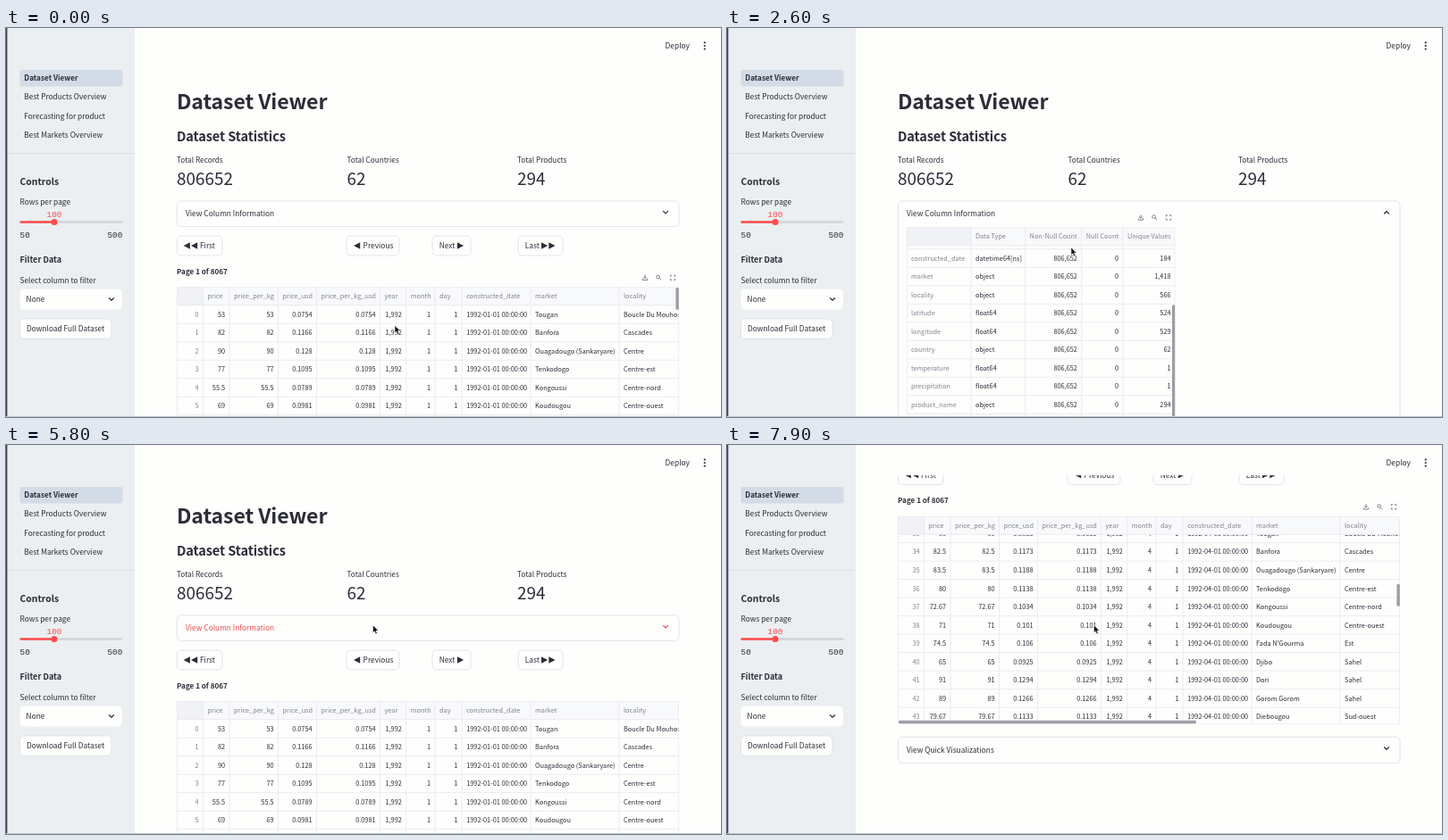
An HTML page that plays this animation: 800x436 px, repeating every 8 s.

```html
<!DOCTYPE html>
<html lang="en">
<head>
<meta charset="utf-8">
<title>Dataset Viewer</title>
<style>
html, body { margin: 0; width: 100%; height: 100%; overflow: hidden; background: #fefefd; }
svg { display: block; }
#stage { width: 800px; height: 436px; }
text { font: 8.35px "Noto Sans CJK JP", "Noto Sans CJK SC", "Noto Sans CJK", sans-serif; fill: #2b2d38; white-space: pre; }
.b { font-weight: 700; }
.cell { font-size: 7.35px; }
.dim { font-size: 7.35px; fill: #82848e; }
.mono { font: 9.4px "Liberation Mono", monospace; }
.num { font-size: 18.9px; }
.box { fill: #fefefd; stroke: #dcdde4; stroke-width: .8; }
.grid { fill: none; stroke: #e7e7ef; stroke-width: .8; }
.icon { fill: none; stroke: #6f717c; stroke-width: .9; }
.chev { fill: none; stroke: #31333f; stroke-width: 1.25; stroke-linecap: round; stroke-linejoin: round; }
.bar { fill: #9d9ea6; }
text.red, .red { fill: #ff4b4b; }
.hot text { fill: #f04a48; }
.hot .chev { stroke: #f04a48; }
</style>
</head>
<body>
<svg id="stage" viewBox="0 0 800 436"></svg>
<script>
const BG = '#fefefd', INK = '#2b2d38', ROW = 20.51, LOOP = 8000, TICK = 100;

// Text placed by the middle of its capitals.
const text = (x, y, s, cls = '', size = 8.35, end = false, extra = '') =>
  `<text x="${x}" y="${(y + size * 0.366).toFixed(2)}" class="${cls}" style="font-size:${size}px;${extra}"` +
  `${end ? ' text-anchor="end"' : ''}>${s}</text>`;
const rect = (x, y, w, h, attrs, r = 0) =>
  `<rect x="${x}" y="${y}" width="${w}" height="${h}" rx="${r}" ${attrs}/>`;
const box = (x, y, w, h, r = 4.5) => rect(x, y, w, h, 'class="box"', r);
const line = (x1, y1, x2, y2) => `<path class="grid" d="M${x1} ${y1}L${x2} ${y2}"/>`;
const chevron = (x, y, id = '') => `<path ${id} class="chev" d="M${x - 2.5} ${y - 1.3}l2.5 2.5l2.5 -2.5"/>`;
const tri = (x, y, dir) =>
  `<path fill="${INK}" d="M${x + 3.6 * dir} ${y}l${-7.2 * dir} -3.7v7.4z"/>`;
const tools = (id, x, y) => `<g id="${id}" class="icon">
  <path d="M${x} ${y - 3}v4m-1.8 -1.8l1.8 1.8l1.8 -1.8M${x - 2.7} ${y + 1}v1.8h5.4v-1.8"/>
  <circle cx="${x + 14.6}" cy="${y - .7}" r="1.8"/><path d="M${x + 16} ${y + .7}l2 2"/>
  <path d="M${x + 28.3} ${y - 1}v-1.6h1.6m2.2 0h1.6v1.6m0 2.2v1.6h-1.6m-2.2 0h-1.6v-1.6"/></g>`;

// Scrolling table; columns: [left edge, title, right aligned].
function table(id, x, y, w, h, cols, rows) {
  const edge = i => i + 1 < cols.length ? cols[i + 1][0] : w;
  const cell = (v, i, cy, head) => {
    const end = cols[i][2] && !head;
    return text(end ? edge(i) - 4.9 : cols[i][0] + 5, cy, v, i === 0 || head ? 'dim' : 'cell', 7.35, end);
  };
  const body = rows.map((r, n) => r.map((v, i) => cell(v, i, ROW * (n + .5))).join('') +
    line(0, ROW * (n + 1), w, ROW * (n + 1))).join('');
  return `<svg x="${x}" y="${y}" width="${w}" height="${h}">
    <svg y="${ROW}" width="${w}" height="${h - ROW}"><g id="${id}Rows">${body}</g></svg>
    ${rect(0, 0, w, ROW, 'fill="#f8f9fb"')}${rect(0, 0, edge(0), ROW, 'fill="#f1f2f6"')}
    ${cols.map((c, i) => cell(c[1], i, ROW / 2, true) + (i ? line(c[0], 0, c[0], h) : '')).join('')}
    ${line(0, ROW, w, ROW)}${rect(.4, .4, w - .8, h - .8, 'class="grid"', 3)}
    <g id="${id}Bars"></g></svg>`;
}

// Column summary
const info = [
  ['price', 'float64', '99,241'], ['price_per_kg', 'float64', '94,941'],
  ['price_usd', 'float64', '405,137'], ['price_per_kg_usd', 'float64', '350,823'],
  ['year', 'int64', '19'], ['month', 'int64', '12'], ['day', 'int64', '1'],
  ['constructed_date', 'datetime64[ns]', '184'], ['market', 'object', '1,418'],
  ['locality', 'object', '566'], ['latitude', 'float64', '524'], ['longitude', 'float64', '529'],
  ['country', 'object', '62'], ['temperature', 'float64', '1'], ['precipitation', 'float64', '1'],
  ['product_name', 'object', '294'], ['category', 'object', '8']
].map(([name, type, unique]) => {
  const gaps = name.includes('per_kg');
  return [name, type, gaps ? '699,874' : '806,652', gaps ? '106,778' : '0', unique];
});
const infoCols = [[0, ''], [72, 'Data Type'], [132.6, 'Non-Null Count', 1], [195.8, 'Null Count', 1], [242, 'Unique Values', 1]];

// Price records: eleven markets a month
const places = [
  ['Tougan', 'Boucle Du Mouhoun'], ['Banfora', 'Cascades'], ['Ouagadougo (Sankaryare)', 'Centre'],
  ['Tenkodogo', 'Centre-est'], ['Kongoussi', 'Centre-nord'], ['Koudougou', 'Centre-ouest'],
  ["Fada N'Gourma", 'Est'], ['Djibo', 'Sahel'], ['Gorom Gorom', 'Sahel'], ['Dori', 'Sahel'], ['Diebougou', 'Sud-ouest']
];
const first = [53, 82, 90, 77, 55.5, 69, 70.25, 57.67, 75.75, 73, 75];
const last = [60, 82.5, 83.5, 80, 72.67, 71, 74.5, 65, 91, 89, 79.67];
const records = Array.from({ length: 46 }, (_, n) => {
  const i = n % 11, m = Math.floor(n / 11);
  const price = m === 0 ? first[i] : m === 3 ? last[i] : Math.round(first[i] + (last[i] - first[i]) * m / 3);
  const usd = +(price * 0.00142235).toFixed(4);
  const place = places[m === 3 && (i === 8 || i === 9) ? 17 - i : i];
  return [n, price, price, usd, usd, '1,992', m + 1, 1, `1992-0${m + 1}-01 00:00:00`, ...place];
});
const recordCols = [[0, '', 1], [29.5, 'price', 1], [59, 'price_per_kg', 1], [113.5, 'price_usd', 1],
  [156.5, 'price_per_kg_usd', 1], [227.5, 'year', 1], [256.7, 'month', 1], [289, 'day', 1],
  [319.2, 'constructed_date'], [396, 'market'], [495, 'locality']];

const metric = (x, label, value) => text(x, 148, label, '', 8.25) + text(x, 169, value, 'num', 18.9);

const page = `<g id="page">
  ${text(191, 83, 'Dataset Viewer', 'b', 23.1, false, 'letter-spacing:-.005em')}
  ${text(191, 122, 'Dataset Statistics', 'b', 14.6, false, 'letter-spacing:-.008em')}
  ${metric(191, 'Total Records', '806652')}${metric(381.5, 'Total Countries', '62')}${metric(572, 'Total Products', '294')}
  <rect id="panel" x="191.4" y="194" width="561.6" rx="4.5" class="box"/>
  <svg id="fold" x="191" y="222.5" width="562" height="0">
    ${table('info', 10, .7, 300.5, 230, infoCols, info)}
  </svg>
  <g id="head">${text(201, 208, 'View Column Information')}${chevron(738, 206.7, 'id="arrow"')}</g>
  ${tools('infoTools', 463, 212.3)}
  <g id="below">
    ${box(191.4, 233, 50.6, 22)}${tri(202.3, 244, -1)}${tri(210.6, 244, -1)}${text(217, 244, 'First')}
    ${box(381, 233, 59, 22)}${tri(392.6, 244, -1)}${text(399.6, 244, 'Previous')}
    ${box(477, 233, 43, 22)}${text(484.7, 244, 'Next')}${tri(508.5, 244, 1)}
    ${box(573, 233, 50, 22)}${text(580.8, 244, 'Last')}${tri(602.6, 244, 1)}${tri(610.9, 244, 1)}
    ${text(191, 273, 'Page 1 of 8067', 'b', 8.15)}
    ${tools('mainTools', 715, 279.7)}
    ${table('main', 191, 290.2, 562, 233.5, recordCols, records)}
    ${box(191.4, 537.8, 561.6, 29.4)}${text(201, 552.5, 'View Quick Visualizations')}${chevron(738, 550.6)}
  </g></g>
  ${rect(145, 0, 655, 34, `fill="${BG}"`)}
  ${text(737.6, 20, 'Deploy')}
  ${[16.4, 20, 23.6].map(y => `<circle cx="781.7" cy="${y}" r="1.05" fill="${INK}"/>`).join('')}`;

const links = ['Dataset Viewer', 'Best Products Overview', 'Forecasting for product', 'Best Markets Overview'];
const sidebar = rect(0, 0, 144, 436, 'fill="#ebeff1"') +
  rect(15.5, 47, 115, 18.4, 'fill="#d2dbe6"', 2.4) +
  links.map((s, i) => text(20.3, 56.3 + i * 21.1, s, i ? '' : 'b', i ? 8.35 : 8.2)).join('') +
  rect(0, 140, 144, .8, 'fill="#d9dde2"') +
  text(15.5, 171.8, 'Controls', 'b', 10.4) + text(15.5, 195.3, 'Rows per page') +
  `<text x="45.6" y="212" class="mono red">100</text>` +
  rect(15.5, 216.3, 115, 2.4, 'fill="#cfd4da"', 1.2) + rect(15.5, 216.3, 38.5, 2.4, 'class="red"', 1.2) +
  `<circle cx="54" cy="217.5" r="3.5" class="red"/>
   <text x="15.5" y="234.6" class="mono">50</text><text x="130.3" y="234.6" class="mono" text-anchor="end">500</text>` +
  text(15.5, 259.3, 'Filter Data', 'b', 9.1) + text(15.5, 282.6, 'Select column to filter') +
  rect(15.5, 292.7, 114.5, 22.8, `fill="${BG}"`, 4.5) + text(22.6, 304, 'None') + chevron(118, 304) +
  box(15.5, 326, 102.5, 22.3) + text(23, 337, 'Download Full Dataset');

const frame = rect(0, 0, 1.4, 436, 'fill="#3c3d42"') + rect(0, 435, 800, 1, 'fill="#c6c7ca"');
const pointer = `<path id="pointer" d="M0 0v8.4l1.9 -1.7l1.3 3l1.6 -.7l-1.3 -2.9h2.7z"
  fill="#08080a" stroke="#fff" stroke-width=".6"/>`;

const $ = id => document.getElementById(id);
$('stage').innerHTML = page + sidebar + frame + pointer;

// Time, x, y
const path = [[0, 435, 333.5], [250, 435, 333.5], [900, 288, 214], [1100, 280.5, 206.5], [1700, 280.5, 206.5],
  [2050, 385, 246], [2700, 385, 246], [3500, 380, 300], [4200, 380, 300], [4800, 337, 207],
  [5150, 337, 207], [5350, 337, 222], [5450, 337, 222], [5750, 410.5, 202]];

const clamp = p => Math.max(0, Math.min(1, p));
const span = (t, a, b) => clamp((t - a) / (b - a));
const smooth = p => p * p * (3 - 2 * p);
const out = p => 1 - (1 - p) ** 4;

function pointerAt(t) {
  let i = 0;
  while (i < path.length - 1 && path[i + 1][0] <= t) i++;
  const a = path[i], b = path[i + 1] || a;
  const p = a === b ? 0 : smooth(span(t, a[0], b[0]));
  return [a[1] + (b[1] - a[1]) * p, a[2] + (b[2] - a[2]) * p];
}

const show = (id, on) => $(id).setAttribute('visibility', on ? 'visible' : 'hidden');
const move = (id, x, y) => $(id).setAttribute('transform', `translate(${x} ${y})`);

function draw(t) {
  const [x, y] = pointerAt(t);
  const fold = 240 * (out(span(t, 1420, 1920)) - out(span(t, 5078, 5578)));
  const scroll = 210.5 * smooth(span(t, 5750, 6450));
  const infoScroll = 139.5 * smooth(span(t, 2050, 2550));
  const mainScroll = 688 * smooth(span(t, 6800, 7900));

  const py = y + scroll;
  const onHead = py > 194 && py < 222.5;
  const onInfo = py >= 222.5 && py < 222.5 + fold && x > 201 && x < 502;
  const onMain = py > 290 + fold && py < 524 + fold && x > 191 && x < 753;

  move('pointer', x, y);
  move('page', 0, -scroll);
  move('below', 0, fold);
  move('infoRows', 0, -infoScroll);
  move('mainRows', 0, -mainScroll);
  $('panel').setAttribute('height', 28.6 + fold);
  $('fold').setAttribute('height', fold);
  $('head').setAttribute('class', onHead ? 'hot' : '');
  $('arrow').setAttribute('transform', t >= 1420 && t < 5078 ? 'rotate(180 738 206.7)' : '');
  show('infoTools', onInfo);
  show('mainTools', onMain);
  $('infoBars').innerHTML = onInfo ? rect(297, infoScroll * .624, 3.4, 143, 'class="bar"', 1.5) : '';
  $('mainBars').innerHTML = onMain
    ? rect(558.4, .6 + mainScroll * .1095, 3.4, 25, 'class="bar"', 1.5) + rect(1, 229, 333, 3.6, 'class="bar"', 1.5) : '';
}

const start = performance.now();
function loop(now) {
  const t = Math.max(0, now - start) % LOOP;
  draw(Math.floor(t / TICK) * TICK);
  requestAnimationFrame(loop);
}
draw(0);
requestAnimationFrame(loop);
</script>
</body>
</html>
```
